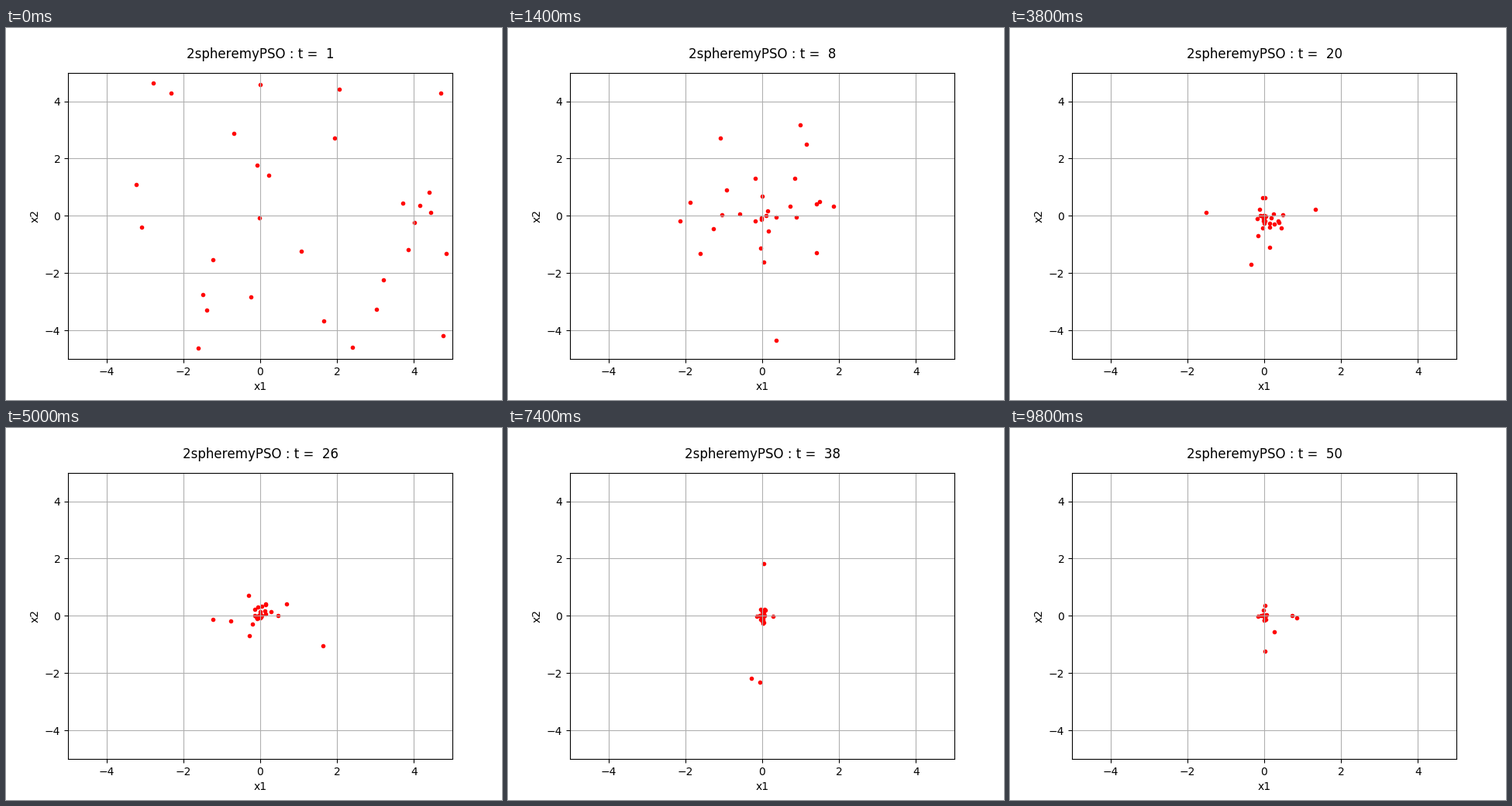
These frames come from a looping animation (640x480 px, 10 s). A matplotlib script:

```python
import numpy as np
import matplotlib.pyplot as plt
from matplotlib.animation import FuncAnimation

FRAMES = 50
INTERVAL = 200
SWARM = 29
LIMIT = 5
INERTIA, PULL = 0.729, 1.494

# One far-flung particle: frame, x, y
STRAY = np.array([(0, -1.61, -4.62), (7, 5.60, -1.00), (12, -0.11, -4.13),
                  (16, 0.00, -7.00), (19, 0.00, -6.00), (25, 1.63, -1.05),
                  (33, 0.00, -3.04), (37, -0.28, -2.19), (42, -0.10, 0.10),
                  (49, 0.00, 0.00)])


def sphere(x):
    return (x ** 2).sum(axis=1)


def simulate(seed):
    """Particle swarm on the sphere function: positions for every frame."""
    rng = np.random.default_rng(seed)
    x = rng.uniform(-LIMIT, LIMIT, (SWARM, 2))
    v = np.zeros_like(x)
    best = x.copy()
    path = [x]
    for _ in range(FRAMES - 1):
        leader = best[sphere(best).argmin()]
        r1, r2 = rng.random((2, SWARM, 2))
        v = INERTIA * v + PULL * (r1 * (best - x) + r2 * (leader - x))
        x = x + v
        better = sphere(x) < sphere(best)
        best[better] = x[better]
        path.append(x)
    return path


swarm = simulate(4)
frames = np.arange(FRAMES)
stray = np.column_stack([np.interp(frames, STRAY[:, 0], STRAY[:, i])
                         for i in (1, 2)])

plt.rcParams["text.kerning_factor"] = 6
fig, ax = plt.subplots(figsize=(6.4, 4.8), dpi=100)
ax.set_xlim(-LIMIT, LIMIT)
ax.set_ylim(-LIMIT, LIMIT)
ax.set_xticks(range(-4, 5, 2))
ax.set_yticks(range(-4, 5, 2))
ax.set_xlabel("x1")
ax.set_ylabel("x2")
ax.grid(True)
dots = ax.scatter([], [], c="red", marker=".")
title = ax.text(0.5, 1.05, "", transform=ax.transAxes, ha="center",
                fontsize=12)


def update(frame):
    dots.set_offsets(np.vstack([swarm[frame], stray[frame]]))
    title.set_text(f"2spheremyPSO : t =  {frame + 1}")
    return dots, title


anim = FuncAnimation(fig, update, frames=FRAMES, interval=INTERVAL,
                     init_func=lambda: update(0), repeat=True, repeat_delay=0)
plt.show()
```
